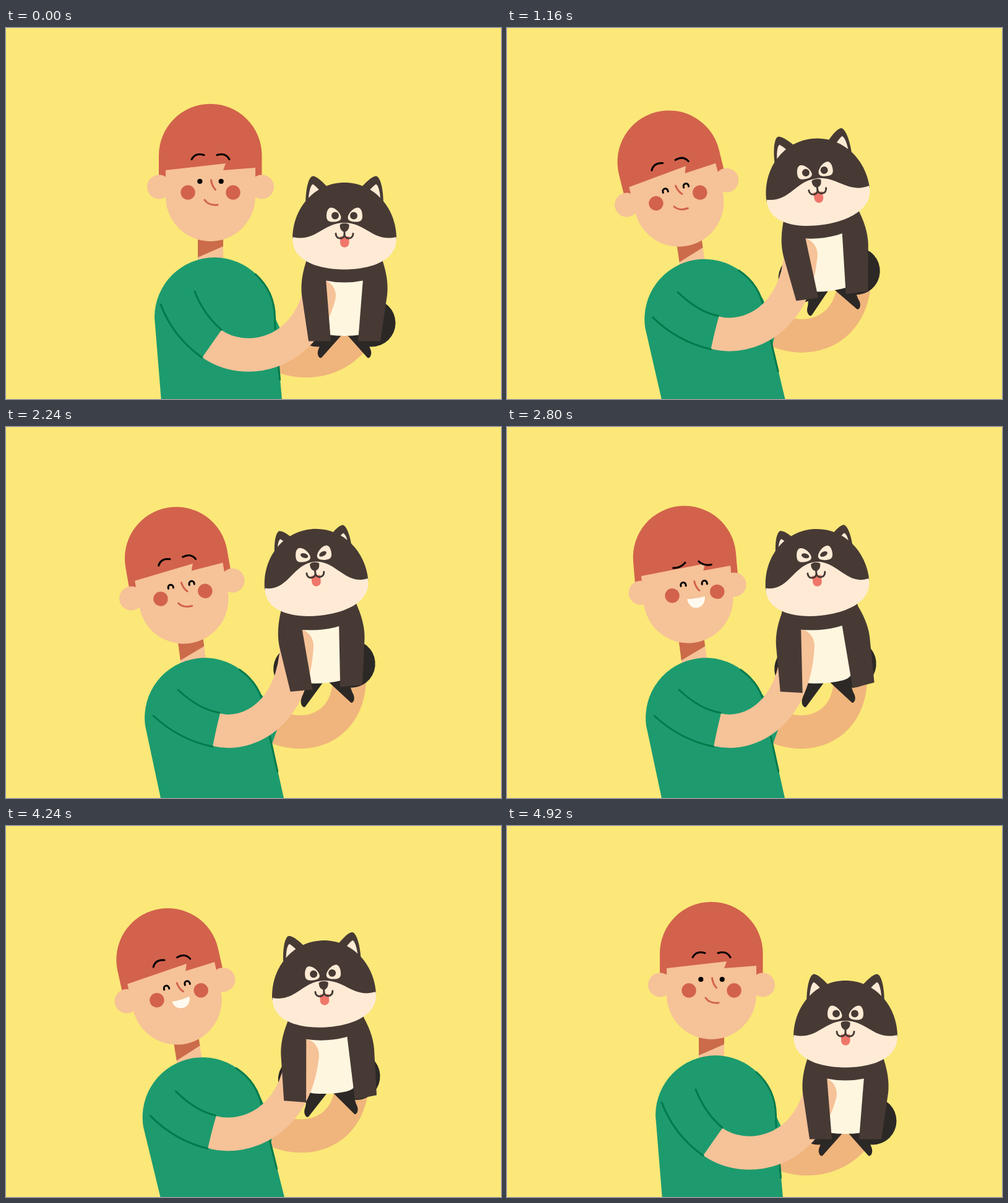
Animation, 800 px wide and 600 px high, one loop 4.96 s. Source, as an HTML page with a canvas:

```html
<!DOCTYPE html>
<html lang="en">
<head>
<meta charset="utf-8">
<title>Boy lifting a dog</title>
<style>
html, body { margin: 0; width: 100%; height: 100%; overflow: hidden; background: #fbe878; }
canvas { display: block; }
</style>
</head>
<body>
<canvas id="stage" width="800" height="600"></canvas>
<script>
const ctx = document.getElementById('stage').getContext('2d');
const LOOP = 4960;
const C = {
  bg: '#fbe878', hair: '#d2624c', skin: '#f6c298', farSkin: '#f0b57c', neckShade: '#cb6b49',
  shirt: '#1d9b6e', seam: '#007a4b', fur: '#473a35', deepFur: '#2c2826',
  cream: '#ffebd5', chest: '#fff6df', tongue: '#f0766a', teeth: '#fffaf0', ink: '#000'
};
const HIP = [347, 592];

const mix = (a, b, k) => a + (b - a) * k;
const mixAll = (a, b, k) => a.map((v, i) => mix(v, b[i], k));
const rad = deg => deg * Math.PI / 180;

function ramp(t, from, to) {
  const x = Math.min(1, Math.max(0, (t - from) / (to - from)));
  return x * x * (3 - 2 * x);
}
// Eases from 0 to 1, stays, and eases back.
const hold = (t, a, b, c, d) => ramp(t, a, b) - ramp(t, c, d);
// A cosine arch around a moment; its square is the softer kick.
const arch = (t, mid, reach) => Math.cos(Math.PI / 2 * Math.min(1, Math.abs(t - mid) / reach));
const kick = (t, mid, reach) => arch(t, mid, reach) ** 2;

function poseAt(t) {
  const lift = hold(t, 820, 1260, 4140, 4470);
  const held = hold(t, 800, 1260, 4230, 4500);
  const turn = hold(t, 2400, 2760, 3980, 4460);
  const swingUp = kick(t, 1260, 380);
  const swing = swingUp + .8 * kick(t, 4230, 270);
  const dip = kick(t, 800, 380) + kick(t, 4510, 270);
  const lean = dip - 7.4 * held - 2.1 * swing;
  return {
    lift, lean, turn,
    slack: lean + 7.4 * lift,
    x: 547 - 30 * lift + 4 * swingUp,
    y: 498 - 84 * lift + 3 * dip,
    tilt: -5.5 * hold(t, 820, 1260, 4000, 4300) - 3.6 * swing,
    flap: t > 1100 && t < 4700 ? Math.sin(Math.PI * (t - 1100) / 1200) ** 2 : 0,
    look: arch(t, 2500, 1350),
    worry: hold(t, 2400, 2720, 3680, 3920),
    mouth: hold(t, 2400, 2640, 4190, 4440),
    smiling: t > 900 && t < 4430,
    headX: 330.5 - 43.5 * held - 17 * swing + 6 * turn + 3 * dip,
    headY: 272.5 + 5.5 * held + 4.5 * swing - turn,
    headTilt: 2 * dip - 10 * held - 6 * swing + 5 * turn
  };
}

function turned(x, y, deg, [px, py]) {
  const c = Math.cos(rad(deg)), s = Math.sin(rad(deg));
  return [px + (x - px) * c - (y - py) * s, py + (x - px) * s + (y - py) * c];
}

function group(deg, [px, py], draw) {
  ctx.save();
  ctx.translate(px, py);
  ctx.rotate(rad(deg));
  ctx.translate(-px, -py);
  draw();
  ctx.restore();
}

function mirror(cx, draw) {
  draw();
  ctx.save();
  ctx.translate(2 * cx, 0);
  ctx.scale(-1, 1);
  draw();
  ctx.restore();
}

function fill(path, color) {
  ctx.fillStyle = color;
  ctx.fill(new Path2D(path));
}

function line(path, color, width = 3, cap = 'round') {
  ctx.strokeStyle = color;
  ctx.lineWidth = width;
  ctx.lineCap = cap;
  ctx.lineJoin = 'round';
  ctx.stroke(new Path2D(path));
}

function oval(x, y, rx, color, ry = rx, deg = 0) {
  ctx.fillStyle = color;
  ctx.beginPath();
  ctx.ellipse(x, y, rx, ry, rad(deg), 0, 2 * Math.PI);
  ctx.fill();
}

function limb(p, color) {
  line(`M${p[0]},${p[1]}C${p.slice(2)}`, color, 54, 'butt');
  oval(p[6], p[7], 27, color);
}

function drawFarArm(s) {
  const bend = s.lift ** .8;
  const arm = mixAll([425, 520, 470, 548, 525, 545], [425, 480, 480, 510, 550, 490], bend);
  limb([...arm, s.x + mix(15, 38, bend), s.y + mix(5, -2, bend)], C.farSkin);
  const sleeve = mixAll([415, 430, 434, 467, 442, 484, 441, 545],
    [395, 415, 416, 436, 438, 490, 430, 512], s.lift);
  group(s.slack, HIP, () => fill(`M${sleeve}Z`, C.shirt));
}

function drawTorso(s) {
  group(s.lean, HIP, () => {
    fill('M310,325H351V400H310Z', C.skin);
    fill('M310,325H351V353L310,371Z', C.neckShade);
    fill('M240,468A97,97 0 0 1 434,468L454,690H258Z', C.shirt);
    line('M403,398Q434,426 434.5,468L435,487', C.seam);
    line('M437.5,512L442.5,569', C.seam);
  });
}

function drawNearArm(s) {
  const near = mixAll([332.5, 510.5, 385, 548], [339.5, 489.5, 395, 503], s.lift);
  const start = turned(near[0], near[1], s.slack, HIP);
  const bend = turned(near[2], near[3], s.slack, HIP);
  const elbow = mixAll([480, 530], [465, 460], s.lift);
  const hand = turned(s.x - 41, s.y - 65, s.tilt, [s.x, s.y]);
  limb([...start, ...bend, ...elbow, ...hand], C.skin);

  const low = mixAll([250, 447, 270, 500, 317, 533], [238, 467, 280, 506, 334, 517], s.lift);
  const high = mixAll([305, 426, 319, 463, 348, 488], [278, 425, 312, 457, 345, 462], s.lift);
  const curve = p => `${p.slice(0, 2)}Q${p.slice(2)}`;
  group(s.slack, HIP, () => {
    fill(`M${curve(low)}L${high.slice(4)}Q${high.slice(2, 4)} ${high.slice(0, 2)}Z`, C.shirt);
    line('M' + curve(low), C.seam);
    line('M' + curve(high), C.seam);
  });
}

// The dog is drawn in its seated position and moved as a whole.
function dogGroup(s, draw) {
  ctx.save();
  ctx.translate(s.x, s.y);
  ctx.rotate(rad(s.tilt));
  ctx.translate(-547, -498);
  draw();
  ctx.restore();
}

function drawDogBack(s) {
  dogGroup(s, () => {
    mirror(547, () => {
      oval(591, 477 - 6 * s.lift, 38.5, C.deepFur);
      fill('M543,496L511,532Q508,536 505,531Q502,525 506,517L512,492Z', C.deepFur);
    });
    fill('M500,385H594L589,484Q587,494 574,496Q547,500 520,496Q507,494 505,484Z', C.chest);
  });
}

function drawDogFront(s) {
  dogGroup(s, () => {
    fill('M487,368H607L612,398Q547,425 482,398Z', C.fur);
    mirror(547, () => group(9.3 * s.flap, [492, 385], () =>
      fill('M487,372Q475,405 478,432L489,506.5H525L516.5,400L530,372Z', C.fur)));
    drawDogHead(s.look);
  });
}

function drawDogHead(look) {
  const up = -12.5 * look;
  ctx.translate(0, -2 * look);
  mirror(547, () => {
    ctx.save();
    ctx.translate(0, 9 * look);
    fill('M485,300C482,268 488,240 496,239.5C503,240 513,250 522,260L520,300Z', C.fur);
    fill('M488,300Q488,257 496,252.5Q505,259 512,270L510,300Z', C.cream);
    ctx.restore();
  });

  fill('M463,341C463,290 500,250 547,250C594,250 631,290 631,341Z', C.fur);
  const m = 315 + up;
  fill(`M463.5,338C500,347 512,${m} 547,${m}C582,${m} 594,347 630.5,338` +
    'C634,374 593,390.5 547,390.5C501,390.5 460,374 463.5,338Z', C.cream);

  ctx.translate(0, up);
  const squint = Math.max(0, (look - .7) / .3);
  mirror(547, () => {
    fill('M518,304C518,296 521,290 526,290.5C533,291 541,300 541.5,306' +
      'C542,312 535,313.5 528,313.5C521,313.5 518,311 518,304Z', C.cream);
    oval(532, 303.5, mix(6, 6.5, squint), C.fur, mix(6, 3.2, squint), 28 * squint);
  });
  fill('M540,337H554.5V347.5A7.25,7.25 0 0 1 540,347.5Z', C.tongue);
  fill('M539.5,319Q540,316 547,315.8Q554.5,316 554.8,319Q554.5,328.5 547,329.8Q539.5,328.5 539.5,319Z', C.fur);
  line('M533,332.5C533,342.5 547,342.5 547,333.5C547,342.5 561,342.5 561,332.5M547,328V334', C.fur);
}

function drawHead(s) {
  ctx.save();
  ctx.translate(s.headX, s.headY);
  ctx.rotate(rad(s.headTilt));
  fill('M-72.5,-58H72.5V0A72.5,72.5 0 0 1 -72.5,0Z', C.skin);
  const notch = 7.5 * s.turn;
  fill(`M-83.5,-66.5A83.2,83.2 0 0 1 83,-66.5V-28H72.5V-46.5L${20.5 + notch},-42.5` +
    `L${24.5 + notch},-53.5L-72.5,-42.5V-28H-83.5Z`, C.hair);
  const ear = 83 - 7.2 * s.turn;
  mirror(0, () => oval(ear, -15.5, 19.5, C.skin));

  ctx.translate(11 * s.turn, 0);
  const brow = mixAll([-30.5, -60, -24.5, -71.5, -10.5, -67], [-31, -51, -19, -49.5, -11, -58], s.worry);
  mirror(0, () => {
    line(`M${brow.slice(0, 2)}Q${brow.slice(2)}`, C.ink);
    oval(-36.5, -6.5, 11.7, C.hair);
    if (s.smiling) line('M-21.3,-20.5V-22A4.1,4.1 0 0 1 -13.1,-22V-20.5', C.ink);
    else oval(-17.2, -24.5, 4.1, C.ink);
  });
  line('M1,-26.5Q2.5,-16.5 8,-11', C.hair);
  if (s.mouth > .15) {
    const depth = 23 * s.mouth;
    fill(`M-13,1Q1,2 16,-1C16,${depth * .92} -11,${depth} -13,1Z`, C.teeth);
  } else {
    line('M-9.5,5.5Q-3,15 11.5,13.5', C.hair);
  }
  ctx.restore();
}

function frame(now) {
  const pose = poseAt(now % LOOP);
  ctx.fillStyle = C.bg;
  ctx.fillRect(0, 0, 800, 600);
  for (const draw of [drawFarArm, drawTorso, drawDogBack, drawNearArm, drawDogFront, drawHead]) draw(pose);
  requestAnimationFrame(frame);
}
frame(performance.now());
</script>
</body>
</html>
```
